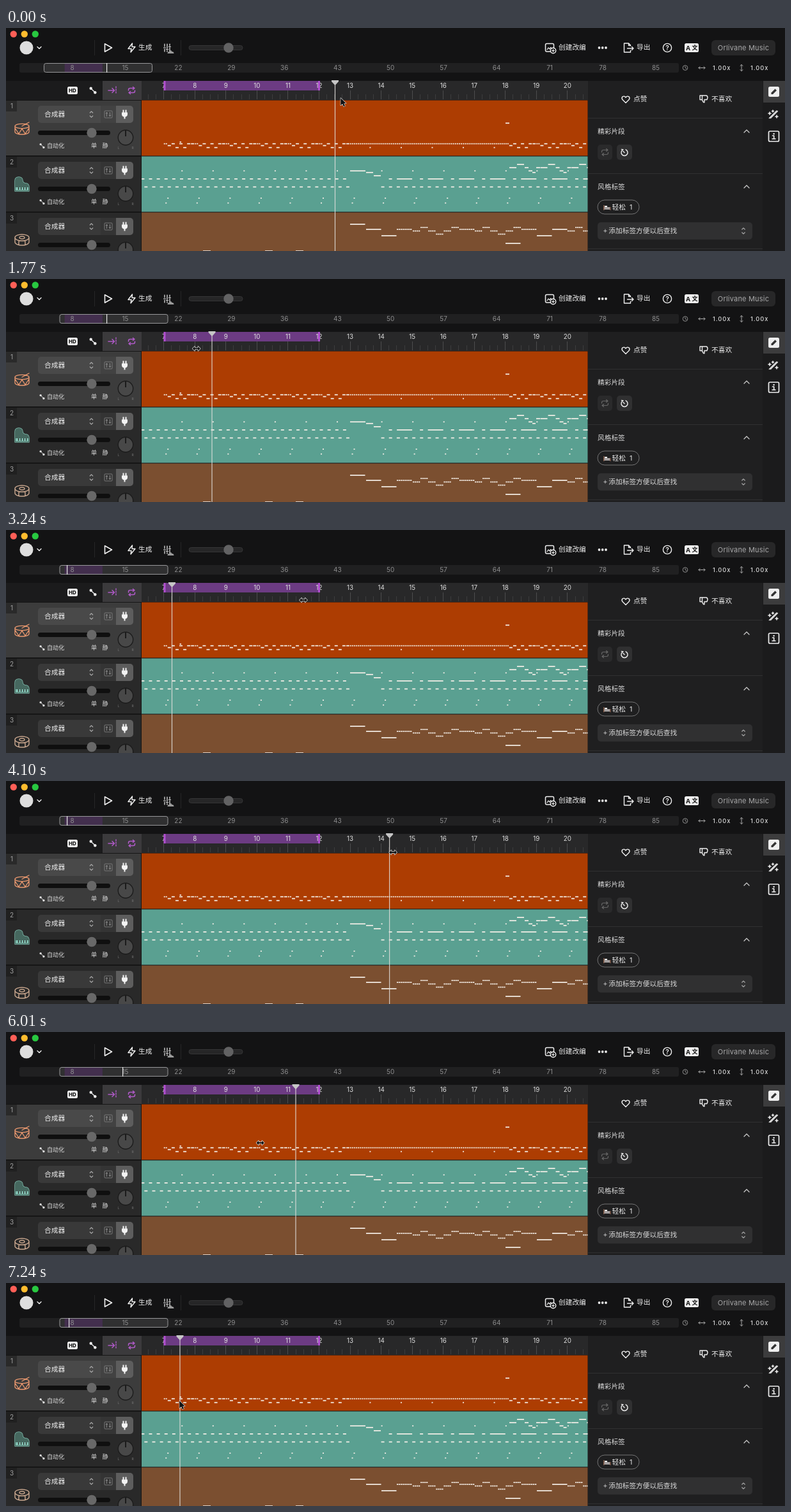
Write an HTML page with a canvas that moves like this. It is 1218 px wide and 350 px high and loops after 7.77 s.

```html
<!DOCTYPE html>
<html lang="zh-CN">
<head>
<meta charset="utf-8">
<title>编曲时间轴</title>
<style>
html, body { margin: 0; width: 100%; height: 100%; overflow: hidden; background: #131314; }
canvas { display: block; }
</style>
</head>
<body>
<canvas id="stage" width="1218" height="350"></canvas>
<script>
const W = 1218, H = 350, LOOP = 7770, BAR = 48.55;
const LATIN = "Inter, 'Noto Sans CJK SC', 'Noto Sans CJK', sans-serif";
const CJK = "'Noto Sans CJK SC', 'Noto Sans CJK', sans-serif";
const screen = document.getElementById('stage').getContext('2d');
const backdrop = document.createElement('canvas');
backdrop.width = W;
backdrop.height = H;
let c = backdrop.getContext('2d');

const barX = n => 295.3 + (n - 8) * BAR;
const mapX = n => 103.5 + (n - 8) * 11.85;

function rect(x, y, w, h, color) {
  c.fillStyle = color;
  c.fillRect(x, y, w, h);
}
function round(x, y, w, h, r, fill, stroke, width = 1) {
  c.beginPath();
  c.roundRect(x, y, w, h, r);
  paint(fill, stroke, width);
}
function disc(x, y, r, fill, stroke, width = 1) {
  c.beginPath();
  c.arc(x, y, r, 0, Math.PI * 2);
  paint(fill, stroke, width);
}
function path(d, x, y, fill, stroke, width = 1.4) {
  c.save();
  c.translate(x, y);
  const p = new Path2D(d);
  c.lineJoin = c.lineCap = 'round';
  if (stroke) { c.strokeStyle = stroke; c.lineWidth = width; c.stroke(p); }
  if (fill) { c.fillStyle = fill; c.fill(p); }
  c.restore();
}
const line = (d, x, y, color = '#eee', width = 1.4) => path(d, x, y, null, color, width);
function paint(fill, stroke, width) {
  if (fill) { c.fillStyle = fill; c.fill(); }
  if (stroke) { c.strokeStyle = stroke; c.lineWidth = width; c.stroke(); }
}
function text(s, x, y, size, color, { align = 'left', font = LATIN, weight = 400, spacing = 0 } = {}) {
  c.font = `${weight} ${size}px ${font}`;
  c.textAlign = align;
  c.letterSpacing = spacing + 'px';
  c.fillStyle = color;
  c.fillText(s, x, y + size * 0.37);
}
const cjk = (s, x, y, size = 10.7, color = '#eee') => text(s, x, y, size, color, { font: CJK, weight: 500 });
const centered = (s, x, y, size, color, weight = 400) => text(s, x, y, size, color, { align: 'center', weight });

const UPDOWN = 'M-2.2 -2.5L0 -4.7L2.2 -2.5M-2.2 2.5L0 4.7L2.2 2.5';
const REPEAT = 'M-5 0V-1Q-5 -3.5 -2.5 -3.5H4M2 -5.5L4.5 -3.5L2 -1.5M5 0V1Q5 3.5 2.5 3.5H-4M-2 1.5L-4.5 3.5L-2 5.5';
const LEVELS = 'M-4 -6V-2M-4 2V6M0 -6V1M0 4V6M4 -6V-3M4 0V6M-5.5 0H-2.5M-1.5 2.5H1.5M2.5 -1.5H5.5';

function nodes(x, y, s) {
  line(`M${-3 * s} ${-3 * s}L${3 * s} ${3 * s}`, x, y, '#eee', 1.2 * s);
  disc(x - 3 * s, y - 3 * s, 2 * s, '#eee');
  disc(x + 3 * s, y + 3 * s, 2 * s, '#eee');
}

function drawToolbar() {
  ['#ff5f57', '#febc2e', '#28c840'].forEach((color, i) => disc(11.8 + i * 17, 9.5, 5.2, color));
  disc(32, 31, 10.5, '#dedede');
  line('M-3 -1.5L0 1.5L3 -1.5', 52, 31);
  rect(138, 19, 1, 24, '#262627');
  rect(273, 19, 1, 24, '#262627');
  line('M-5 -6.2L6 0L-5 6.2Z', 159.5, 31, '#f2f2f2', 1.6);
  line('M1 -7L-5.5 1.5H-.5L-1.5 7L5.5 -1.5H.5Z', 196.5, 31, '#f2f2f2', 1.4);
  cjk('生成', 207, 30.5);
  line(LEVELS, 252, 31, '#eee', 1.2);
  path('M-5 3Q-5 0 -2 0Q0 -4 2 0Q5 0 5 3Z', 257.5, 37, '#9b9b9b');
  round(286, 27.5, 84, 7, 3.5, '#262627', '#353536');
  disc(348, 31, 7.7, '#626263');

  round(843.5, 24.5, 13, 12.5, 2, null, '#eee', 1.5);
  line('M-3 3L-1 0L1 2L2.5 -.5L4 1', 849, 31, '#eee', 1.2);
  disc(855.5, 35.5, 4.2, '#131314', '#eee', 1.4);
  line('M-2 0H2M0 -2V2', 855.5, 35.5, '#eee', 1.2);
  cjk('创建改编', 864, 30.5);
  [927.5, 932.7, 938].forEach(x => disc(x, 31, 1.9, '#eee'));
  line('M3 -3V-4L0 -7H-7V7H3V4M0 -7V-3.5H3M-2 1H7.5M5 -1.5L7.5 1L5 3.5', 973.5, 31, '#eee', 1.4);
  cjk('导出', 986, 30.5);
  disc(1034, 31, 6.6, null, '#eee', 1.4);
  centered('?', 1034, 31, 10, '#eee', 600);
  round(1061, 24, 22, 14, 2.5, '#eee');
  centered('A', 1066.5, 31, 9.5, '#151515', 700);
  text('文', 1077, 31, 9, '#151515', { align: 'center', font: CJK, weight: 700 });
  round(1103, 19, 100, 24, 6, '#272728');
  text('Orlivane Music', 1153, 31, 11, '#a9a9aa', { align: 'center', spacing: 0.2 });

  round(21, 55, 1031, 15, 3, '#202021');
  disc(1062, 62.5, 3.8, null, '#8e8e8e');
  line('M0 -2V0L2 1', 1062, 62.5, '#8e8e8e', 1);
  line('M-5 0H5M-3 -2L-5 0L-3 2M3 -2L5 0L3 2', 1088, 62.5, '#aaa', 1);
  line('M0 -5V5M-2 -3L0 -5L2 -3M-2 3L0 5L2 3', 1150, 62.5, '#aaa', 1);
  [1105, 1164].forEach(x => text('1.00x', x, 62.5, 9.2, '#ddd', { weight: 500, spacing: 1 }));
}

function drawRuler() {
  rect(0, 83, 910, 31, '#1b1b1c');
  round(96, 92, 16, 12, 2.5, '#f0f0f0');
  centered('HD', 104, 98, 8, '#151515', 800);
  nodes(136, 98, 1.1);
  rect(151, 83, 61, 30, '#3b3a3c');
  line('M-6 0H3M0 -3.5L3.5 0L0 3.5', 166, 98, '#b05ac8', 1.5);
  c.setLineDash([2, 2]);
  line('M0 -6V6', 172, 98, '#b05ac8', 1.4);
  c.setLineDash([]);
  line(REPEAT, 196.5, 98, '#b05ac8', 1.5);

  rect(212, 83, 698, 31, '#282829');
  for (let i = -3; i < 55; i++) {
    const x = barX(7 + i / 4);
    if (x < 212 || x > 908) continue;
    const strong = i % 4 === 0;
    rect(Math.floor(x), strong ? 98 : 104, 1, strong ? 14 : 8, strong ? '#4c4c4d' : '#3c3c3d');
  }
  rect(barX(7), 83, BAR * 5, 15, '#6c3b83');
  for (let n = 7; n <= 20; n++) centered(n, barX(n), 90, 9.8, '#dedede');
  rect(246.5, 83, 3, 15, '#b14fd0');
  rect(488, 83, 3, 15, '#b14fd0');
}

function drawTrackPanel(i) {
  const y = 114 + i * 88, active = i === 0;
  c.save();
  c.translate(0, y);
  rect(0, 0, 211, 86, active ? '#3c3c3c' : '#292929');
  rect(0, 0, 17, 17, active ? '#2a2a2a' : '#202020');
  centered(i + 1, 9, 8.5, 10, '#a0a0a0');
  round(50, 8, 98, 27, [5, 0, 0, 5], active ? '#494949' : '#393939');
  cjk('合成器', 60, 21);
  line(UPDOWN, 133.5, 21.5, '#aaa', 1.2);
  rect(148, 8, 24, 27, active ? '#424242' : '#343434');
  round(154, 16, 12, 11, 1, null, '#777');
  line('M-2.5 3V-3M-4 -1.5L-2.5 -3L-1 -1.5M2.5 -3V3M1 1.5L2.5 3L4 1.5', 160, 21.5, '#888', 1);
  round(172, 8, 27, 27, [0, 5, 5, 0], '#5d5d5d');
  path('M-4.5 -3H4.5V0Q4.5 3 1 4V7H-1V4Q-4.5 3 -4.5 0ZM-3 -7H-1V-3H-3ZM1 -7H3V-3H1Z', 185.5, 21.5, '#f4f4f4');
  round(50, 47, 113, 7, 3.5, '#0f0f0f');
  disc(134, 50.5, 7.7, '#686868');
  nodes(56.5, 71, 0.8);
  cjk('自动化', 64, 70.5, 9.1, '#d8d8d8');
  cjk('单', 133, 70.5, 9.1, '#d8d8d8');
  cjk('静', 150.5, 70.5, 9.1, '#d8d8d8');
  disc(187, 58, 11.7, '#484848', '#1c1c1c', 1.4);
  rect(186.3, 47, 1.6, 9, '#111');
  centered('L', 176, 74, 5, '#777');
  centered('R', 198, 74, 5, '#777');
  c.restore();
}

function drawInstruments() {
  const drum = '#ed9a70', piano = '#80bfb0', steel = '#caa88f';
  path('M-11 -4A11 3.6 0 0 0 11 -4A11 3.6 0 0 0 -11 -4V5A11 4 0 0 0 11 5V-4M-11 -1L-5 8L0 0L5 8L11 -1M11 -10L0 -4', 25, 158, null, drum, 1.3);
  path('M-11 11V-5Q-11 -11 -5 -11Q1 -11 1 -5Q2 -1 7 -1Q11 0 11 5V11Z', 25, 245, '#46685f', piano, 1.4);
  rect(15, 250, 20, 5, piano);
  [19, 23, 27, 31].forEach(x => rect(x, 250, 1.2, 4, '#292929'));
  path('M-11 -3A11 5 0 0 0 11 -3A11 5 0 0 0 -11 -3V4A11 5 0 0 0 11 4V-3M-4 -3A4 2 0 0 0 4 -3A4 2 0 0 0 -4 -3M-5 2V8M5 2V8', 25, 332, null, steel, 1.4);
}

const note = (x, y, w) => rect(x, y - 0.8, w, 1.7, '#f5efe8');

function drawDrumNotes() {
  const eighth = BAR / 8;
  for (let i = 0; i < 109; i++) {
    const x = barX(7) + i * eighth, step = i % 8;
    if (i >= 48 && i < 88) {
      note(x, 181.6, 2);
      note(x + eighth / 2, 181.6, 2);
      if (step === 5) note(x, 187.6, 2);
    } else if (step % 2 === 0) {
      note(x, 181.6, step === 0 ? 2 : 5);
      if (step === 0) note(x + 3, 181.6, 2);
    } else {
      note(x, step === 1 ? 184.5 : step === 7 ? 181.6 : 187.6, 5);
    }
  }
  note(271.5, 179, 2.5);
  note(781, 149.3, 6);
}

function drawPianoNotes() {
  const tone = (x, semitones, w) => note(x, 249.4 - semitones * 2.52, w);
  const quarter = BAR / 4;
  for (let i = -3; i < 55; i++) {
    const x = barX(7) + i * quarter;
    if (i < 24) tone(x + 1, 5, 5);
    if (i < 24 || i >= 28) tone(x + (i < 24 ? 6 : 0), 0, 5);
  }
  for (let bar = 7; bar < 21; bar++) {
    const x = barX(bar);
    tone(x + 5.5, -7, 2);
    tone(x + 2.5, -10, 2);
    if (bar !== 13) tone(x + (bar < 13 ? 27.5 : 0), 10, 2);
    if (bar > 13) {
      tone(x + 24.5, 5, 24);
      tone(x + 12, 5, 5);
    }
  }
  tone(538, 10, 24);
  tone(563, 9, 11);
  tone(575, 7, 11);
  const phrase = [[0, 12, 11], [12, 14, 11], [24, 12, 6], [30, 10, 6], [36, 9, 5], [42, 12, 6]];
  for (let k = 0; k < 3; k++) phrase.forEach(([x, pitch, w]) => tone(787 + k * BAR + x, pitch, w));
}

function dotted(x, y, count = 4) {
  for (let i = 0; i < count; i++) note(x + i * 3, y, 2.3);
}
function drawSteelNotes() {
  const sustained = [[538, 308], [563, 316], [587, 326], [781, 338], [830, 326], [854, 316]];
  sustained.forEach(([x, y]) => note(x, y, 23.5));
  [611, 709, 806].forEach(x => dotted(x, 316, 8));
  const riff = [318.5, 313, 318.5, 323.5, 318.5, 313];
  [636, 733, 878].forEach(x => riff.forEach((y, i) => dotted(x + i * 12.1, y)));
  [308, 405, 453].forEach(x => note(x, 350, 12));
}

function drawLanes() {
  rect(0, 113, 910, 237, '#151515');
  for (let i = 0; i < 3; i++) drawTrackPanel(i);
  drawInstruments();
  c.save();
  c.beginPath();
  c.rect(212, 113, 697.5, 237);
  c.clip();
  ['#ad3d02', '#5aa091', '#7b4f30'].forEach((color, i) => rect(212, 113.5 + i * 88, 698, 87, color));
  drawDrumNotes();
  drawPianoNotes();
  drawSteelNotes();
  c.restore();
}

function drawSidebar() {
  rect(910, 83, 273, 267, '#1f1f20');
  line('M0 5.5L-5 .5Q-7 -2 -5 -4.2Q-2 -6 0 -3Q2 -6 5 -4.2Q7 -2 5 .5Z', 969, 112, '#eee', 1.4);
  cjk('点赞', 981, 111.5);
  line('M-2.5 -5.5H4Q6 -5 6 -2L5 1H1V5Q-1 6 -2.5 1ZM-6 -5.5H-2.5V1H-6Z', 1091, 111.5, '#eee', 1.4);
  cjk('不喜欢', 1103, 111.5);
  [141, 228, 346].forEach(y => rect(910, y, 273, 1, '#303031'));
  [['精彩片段', 162], ['风格标签', 249]].forEach(([label, y]) => {
    cjk(label, 925, y, 10.7, '#dcdcdc');
    line('M-4 2L0 -2L4 2', 1158, y, '#ccc', 1.2);
  });
  round(925, 183, 23, 24, 5, '#2a2a2b');
  line(REPEAT, 936.5, 195, '#666', 1.2);
  round(955, 183, 24, 24, 5, '#303031');
  line('M-2 -4.6A5 5 0 1 0 2 -4.6M-2 -4.6L-4.5 -5M0 0L-2 -2', 967, 195.5, '#eee', 1.4);
  round(925, 270, 65, 22, 11, null, '#747475');
  rect(935, 281, 10, 4, '#a4a0a0');
  rect(934, 278, 1.5, 8, '#87604e');
  rect(936, 279, 4, 2, '#eee');
  rect(944, 281, 1.5, 5, '#87604e');
  cjk('轻松', 947.5, 281);
  text('1', 975, 281, 10.5, '#eee');
  round(925, 305, 242, 27, 5, '#303031');
  cjk('+ 添加标签方便以后查找', 934, 318, 10.7, '#dcdcdc');
  line(UPDOWN, 1153, 318.5, '#aaa', 1.2);

  rect(1183, 83, 35, 267, '#1b1b1c');
  rect(1184, 83, 34, 34, '#3c3c3d');
  round(1192, 92, 17, 16, 2.5, '#eee');
  path('M-4 4V1.5L2 -4.5L4.5 -2L-1.5 4Z', 1200.5, 100, '#333');
  line('M-6.5 6.5L5 -5M-1 -6V-3M-2.5 -4.5H.5M5 2V6M3 4H7M-6 -3V1M-8 -1H-4', 1200, 135, '#eee', 1.6);
  line('M-4.5 6.5L6.5 -4.5', 1200, 135, '#eee', 1.3);
  round(1192.5, 162, 16, 16, 2, null, '#eee', 1.7);
  rect(1199.5, 165, 2.2, 2.2, '#eee');
  line('M-1.5 -1.5H.7V3.5M-2 3.5H3', 1200, 170.5, '#eee', 1.6);
}

// Monotone cubic through [time, value] keys.
function track(keys) {
  const slope = keys.slice(1).map((k, i) => (k[1] - keys[i][1]) / (k[0] - keys[i][0]));
  const tangent = keys.map((_, i) => {
    const a = slope[i - 1] || 0, b = slope[i] || 0;
    return a * b > 0 ? 2 * a * b / (a + b) : 0;
  });
  return t => {
    if (t <= keys[0][0]) return keys[0][1];
    const i = keys.findIndex(k => k[0] > t) - 1;
    if (i < 0) return keys[keys.length - 1][1];
    const [t0, v0] = keys[i], [t1, v1] = keys[i + 1], d = t1 - t0, u = (t - t0) / d;
    const s = u * u * (3 - 2 * u);
    return v0 + (v1 - v0) * s + d * u * (1 - u) * (tangent[i] * (1 - u) - tangent[i + 1] * u);
  };
}
// The second drag begins with a click on the ruler, so the playhead snaps to the pointer.
const playheadX = track([
  [1230, 514.5], [1400, 472], [1700, 346], [2000, 268], [2100, 266.5], [2240, 259.5],
  [3490, 259.5], [3520, 465], [3800, 530], [4100, 599.5], [4270, 616],
  [5740, 616], [6010, 453.5], [6250, 355], [6510, 317], [6770, 272]
]);
const pointerX = track([
  [30, 523], [500, 515], [1200, 514], [1400, 434], [1700, 314], [2000, 264],
  [2100, 261.5], [2240, 259], [2470, 259], [2670, 473], [2870, 473], [3240, 465], [3500, 465],
  [3800, 545], [4100, 605], [4270, 616], [5720, 616], [6010, 398], [6250, 334], [6510, 317], [6770, 271]
]);
const pointerY = track([
  [30, 110], [500, 107], [1230, 107], [1400, 106], [2100, 112], [2870, 112], [3240, 110], [3500, 110],
  [4100, 112], [4840, 114], [5040, 167], [5740, 167], [6010, 174], [6770, 185]
]);

function drawOverview(t) {
  const left = t < 30 ? 59.5 : 84;
  const marker = t < 2470 ? 12.5 : t < 4670 ? 7.28 : t < 7010 ? 14.62 : 7.52;
  round(left, 55.5, 169, 14, 3, '#303031');
  rect(mapX(7), 56, mapX(12) - mapX(7), 13, '#432f4e');
  round(left, 55.5, 169, 14, 3, null, '#98989a');
  for (let i = 0; i < 12; i++) centered(8 + i * 7, mapX(8 + i * 7), 62.5, 10, '#8c8c8d');
  rect(Math.round(mapX(marker)), 55, 1.2, 15, '#e8e8e8');
}

function drawPlayhead(x) {
  rect(x - 0.6, 84, 1.2, 266, 'rgba(226, 224, 220, 0.88)');
  path('M-5.5 -7.5H5.5V-5.5L0 .5L-5.5 -5.5Z', x, 89.5, '#c6c6c6');
}

function drawPointer(t) {
  const x = pointerX(t), y = pointerY(t);
  if (t < 300 || t >= 7180) {
    path('M0 0V11.5L2.8 9L4.6 13.2L6.7 12.3L4.9 8.2H8.3Z', x + 0.3, y, '#111', '#ddd', 1.2);
  } else {
    path('M-6 0L-2.6 -3.5V-1H2.6V-3.5L6 0L2.6 3.5V1H-2.6V3.5Z', x, y, '#111', '#ddd', 1.4);
  }
}

function drawBackdrop() {
  rect(0, 0, W, H, '#131314');
  drawToolbar();
  drawRuler();
  drawLanes();
  drawSidebar();
}

drawBackdrop();
c = screen;
const start = performance.now();
function frame() {
  const t = (performance.now() - start) % LOOP;
  c.drawImage(backdrop, 0, 0);
  drawOverview(t);
  drawPlayhead(playheadX(t));
  drawPointer(t);
  requestAnimationFrame(frame);
}
frame();
</script>
</body>
</html>
```
